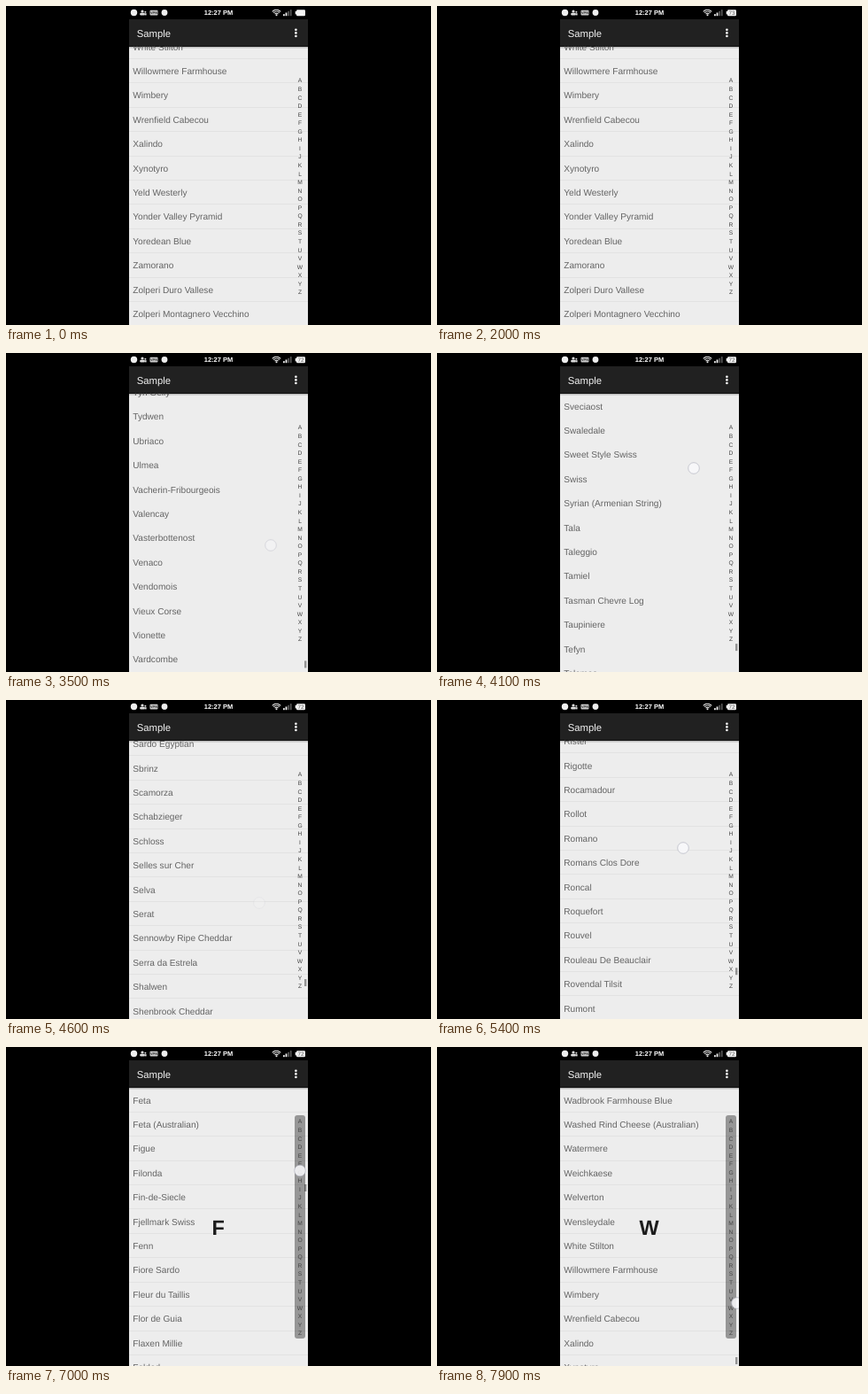
Write an HTML page with a canvas that moves like this. It is 480 px wide and 360 px high and loops after 8000 ms.

```html
<!DOCTYPE html>
<html lang="en">
<head>
<meta charset="utf-8">
<title>Indexed list</title>
<style>
html, body { margin: 0; width: 100%; height: 100%; overflow: hidden; background: #000; }
canvas { display: block; }
</style>
</head>
<body>
<canvas id="stage" width="480" height="360"></canvas>
<script>
const names = `Abbaye de Vallon,Abbaye du Mont des Pres,Abertam,Abondance,Ackawi,Acornel,Adelost,Affine au Chablis,Afuega'l Pitu,Airag,Airdeane,Aisy Cendre
Baguette Ronde,Bakers,Baladi,Balaton,Bandal,Banon,Barrow Bay Cheddar,Basket Cheese,Bath Cheese,Bavarian Bergkase,Beaufort,Beenleaf Blue
Cabecou,Cabrales,Cachaille,Caciocavallo,Caciotta,Caerphilly,Cairnsley,Calenzana,Camembert,Canestrato,Cantal,Caprice
Danablu,Danbo,Danish Fontina,Daralagjazsky,Dauphin,Delice des Bois,Denbury Drum,Derby,Dessertnyj Belyj,Devon Blue,Devon Wreath,Dolce Blu
Edam,Edelpilz,Emental Grand Cru,Emlow,Emmental,Epoisses,Esbareich,Esrom,Etorna,Evenbrook Farm Brie,Evora,Exmoor Blue
Feta,Feta (Australian),Figue,Filonda,Fin-de-Siecle,Fjellmark Swiss,Fenn,Fiore Sardo,Fleur du Taillis,Flor de Guia,Flaxen Millie,Folded
Galette Ronde,Galbrook Goat's Milk,Gammelost,Gaperon a l'Ail,Garrotxa,Gastanberra,Geitost,Gipsel Blue,Gjetost,Gloucester,Golden Ring,Gorgonzola
Halloumi,Halloumi (Australian),Halloumi-Style Cheese,Harbour Blue,Havarti,Hedda Gruyere,Hereford Leaf,Herrgardsost,Hallow Farmhouse,Herve,Hira Iti,Hushallsost
Iberico,Ibery Goat,Idiazabal,Il Tartufo,Ile d'Or,Isle of Wren
Jadel,Jermi,Jibneh Arabieh,Jinder Brie,Jolly Blue,Juustoleipa
Kadchgall,Kaseri,Kashta,Kefalotyri,Kenafa,Kernhem,Kerval Affine,Kiwarra,Kingfold Brie,Klosterkaese,Knockbray,Kugelkase
L'Aveyronnais,L'Ecir,La Taupe,Laguiole,Lairdel,Lajta,Lanwick Blue,Lancashire,Langres,Lappi,Laruns,Lavenby
Macconais,Mahlow Aged Gouda,Mahon,Malvern,Mamirolle,Manchego,Manouri,Manur,Marble Cheddar,Marbled Cheeses,Maresol,Margotin
Naboulsi,Nantais,Neufchatel,Neufchatel (Australian),Niolo,Nokkelost,Northmoor
Oaxaca,Olde Wick,Olivet au Foin,Olivet Bleu,Olivet Cendre,Orkney Mature Cheddar,Orlen,Oschtjepka,Ossau Fermier,Ossau-Iraty,Oszczypek,Oxley Blue
P'tit Berrichon,Palet de Bray,Paneer,Panela,Pannerone,Pant y Glyn,Parmesan,Parmigiano,Pas de Roche,Passenberg,Pasteurized Processed,Pate de Fromage
Quark,Quark (Australian),Quartirolo,Quatre-Monts,Quercy Petit,Queso Blanco,Queso con Frutas,Queso de Murcia,Queso del Monte,Queso Fresco,Queso Iberico,Queso Quesadilla
Rabacal,Raclette,Ragusano,Raschera,Reblochon,Red Leicester,Regal de Bresse,Reggianito,Remedou,Requeson,Richemont,Ricotta,Ricotta (Australian),Ricotta Salata
Ristel,Rigotte,Rocamadour,Rollot,Romano,Romans Clos Dore,Roncal,Roquefort,Rouvel,Rouleau De Beauclair,Rovendal Tilsit,Rumont,Rustello
Saalfeld Pfarr,Saanenkaese,Salda,Sage Derby,Sainte Maure,Saint-Marcellin,Saint-Nectaire,Saint-Paulin,Salers,Samso,San Simon,Sancerre,Sap Sago,Sardo
Sardo Egyptian,Sbrinz,Scamorza,Schabzieger,Schloss,Selles sur Cher,Selva,Serat,Sennowby Ripe Cheddar,Serra da Estrela,Shalwen,Shenbrook Cheddar
Shropshire Blue,Siraz,Sirene,Smoked Gouda,Somerset Brie,Sonnel Jack,Sottobosco Al Tartufo,Soumaintrain,Sourire Vert,Spellwood,Stonefield Organic
St. Amel Blue Cheese,Stilton,Strolling Abbot,String,Sussex Slip,Sveciaost,Swaledale,Sweet Style Swiss,Swiss,Syrian (Armenian String)
Tala,Taleggio,Tamiel,Tasman Chevre Log,Taupiniere,Tefyn,Telemea,Testouri,Tete de Moine,Tetilla,Texas Goat Cheese,Tibet,Tarnbrook Cheddar,Tilsit,Timbery Brie,Toma
Tomme Brulee,Tomme d'Abondance,Tomme de Chevre,Tomme de Romans,Tomme de Savoie,Tomme des Prairies,Tommes,Torta del Casar,Toscanello,Touree de Bois,Tourvalet
Trappe (Veritable),Trois Cornes,Tronchon,Trou du Bois,Truffe,Tupi,Turunmaa,Tymsworth,Tyn Gelly,Tydwen
Ubriaco,Ulmea,Vacherin-Fribourgeois,Valencay,Vasterbottenost,Venaco,Vendomois,Vieux Corse,Vionette,Vardcombe
Wadbrook Farmhouse Blue,Washed Rind Cheese (Australian),Watermere,Weichkaese,Welverton,Wensleydale,White Stilton,Willowmere Farmhouse,Wimbery,Wrenfield Cabecou
Xalindo,Xynotyro,Yeld Westerly,Yonder Valley Pyramid,Yoredean Blue,Zamorano,Zolperi Duro Vallese,Zolperi Montagnero Vecchino`.split(/[,\n]/);

const LOOP = 8000, ROW = 27.4, STEP = 9.56, INDEX_START = 5.9;
const alphabet = [...'ABCDEFGHIJKLMNOPQRSTUVWXYZ'];
const base = names.indexOf('Ristel');

// [seconds, rows scrolled past the base row]
const scrollKeys = [[2.4, 113.51], [2.5, 112.6], [2.7, 109.8], [2.9, 105.8], [3.1, 102.4],
  [3.3, 99.2], [3.5, 95.57], [3.7, 81], [3.9, 67], [4.1, 55], [4.3, 43], [4.6, 27.38],
  [4.8, 17.5], [5, 9.5], [5.3, 1.5], [5.4, .49], [5.6, -1.6], [5.7, -2.6]];
const fingerKeys = [[5.9, 84], [6.3, 88], [6.6, 104], [6.9, 131], [7, 139.5], [7.3, 200],
  [7.6, 280], [7.8, 296], [7.9, 289]];
const thumbKeys = [[0, 50], [5, 159], [17, 300], [22, 354]];
// start, end, then the finger's path
const swipes = [[2.4, 2.7, 305, 140, 301, 235], [3.1, 3.4, 303, 130, 299, 217],
  [4.1, 4.4, 290, 130, 286, 229], [5.3, 5.6, 278.5, 140, 277, 221]];

const g = document.getElementById('stage').getContext('2d');
g.textRendering = 'geometricPrecision';
const lerp = (a, b, f) => a + (b - a) * f;
const clamp = v => Math.max(0, Math.min(1, v));

function along(keys, t) {
  if (t <= keys[0][0]) return keys[0][1];
  const i = keys.findIndex(k => k[0] >= t);
  if (i < 0) return keys[keys.length - 1][1];
  const [a, b] = [keys[i - 1], keys[i]];
  return lerp(a[1], b[1], (t - a[0]) / (b[0] - a[0]));
}

function rect(x, y, w, h, color) {
  g.fillStyle = color;
  g.fillRect(x, y, w, h);
}

function disc(x, y, r, color) {
  g.fillStyle = color;
  g.beginPath();
  g.arc(x, y, r, 0, 7);
  g.fill();
}

function round(x, y, w, h, r, color) {
  g.fillStyle = color;
  g.beginPath();
  g.roundRect(x, y, w, h, r);
  g.fill();
}

function text(s, x, y, size, color, align = 'left', weight = '') {
  g.font = `${weight} ${size}px "Liberation Sans", Arial, sans-serif`;
  g.textAlign = align;
  g.fillStyle = color;
  g.fillText(s, x, y);
}

function touch(x, y, alpha) {
  g.globalAlpha = clamp(alpha);
  disc(x, y, 6.3, 'rgba(248,248,250,.88)');
  g.strokeStyle = 'rgba(170,172,185,.75)';
  g.lineWidth = .8;
  g.stroke();
  g.globalAlpha = 1;
}

function drawList(top, lines) {
  rect(139, 46, 202, 314, '#ededed');
  const first = Math.max(0, Math.floor(top) - 1);
  for (let i = first; i < first + 15 && i < names.length; i++) {
    const y = 60 + (i - top) * ROW;
    text(names[i], 143.3, y + 3.6, 10.1, '#646464');
    if (lines) rect(139, Math.round(y + ROW / 2 - .8), 202, 1, '#e2e2e2');
  }
}

function drawBars(t) {
  rect(139, 0, 202, 15, '#000');
  rect(139, 15, 202, 30.6, '#212121');
  const shade = g.createLinearGradient(0, 46, 0, 48.5);
  shade.addColorStop(0, 'rgba(0,0,0,.25)');
  shade.addColorStop(1, 'rgba(0,0,0,0)');
  rect(139, 45.6, 202, 3, shade);
  text('Sample', 147.7, 34.6, 11.3, '#f2f2f2');
  for (const y of [26.8, 30.4, 34]) disc(327.4, y, 1.35, '#f4f4f4');

  disc(144.5, 7.5, 3.7, '#eee');
  disc(154, 6, 1.6, '#ddd');
  round(151.2, 7.8, 5.6, 2.8, 1.3, '#ddd');
  disc(157.4, 6.8, 1, '#ddd');
  rect(156.6, 8.2, 2, 2.2, '#ddd');
  round(162.5, 4.8, 9, 5.6, 1, '#ccc');
  text('VPN', 167, 9.1, 3.9, '#222', 'center', 'bold');
  disc(179, 7.5, 3.4, '#eee');
  text('12:27 PM', 240, 10.3, 7.5, '#fff', 'center', 'bold');

  g.strokeStyle = '#eee';
  g.lineWidth = 1.1;
  for (const r of [2.6, 4.6, 6.5]) {
    g.beginPath();
    g.arc(305.5, 10.8, r, -Math.PI * .76, -Math.PI * .24);
    g.stroke();
  }
  disc(305.5, 10.2, 1, '#eee');
  for (let i = 0; i < 4; i++)
    rect(313 + i * 2.6, 9.2 - i * 1.7, 1.8, 2 + i * 1.7, i < 2 ? '#eee' : '#555');
  round(328, 4.2, 10, 7, 1.2, '#f4f4f4');
  rect(326.7, 6, 1.5, 3.4, '#f4f4f4');
  if (t >= .3) text(t < 2.1 ? '73' : '72', 333, 10, 6.2, '#555', 'center');
}

function draw(t) {
  const indexing = t >= INDEX_START;
  const fade = clamp((t - INDEX_START + .1) / .3);
  const fingerY = along(fingerKeys, t);
  const section = Math.floor((along(fingerKeys, t - .1) - 79.5) / STEP);
  const rows = along(scrollKeys, t);
  const top = indexing ? names.findIndex(n => n[0] === alphabet[section]) : base + rows;

  rect(0, 0, 480, 360, '#000');
  g.save();
  g.beginPath();
  g.rect(139, 0, 202, 360);
  g.clip();
  drawList(top, t < 3 || t >= 4.4);

  if (t >= 2.4) {
    const y = indexing ? along(thumbKeys, section) : 306 + rows * .475;
    rect(337, y - 4, 2.4, 8, 'rgba(0,0,0,.38)');
  }
  if (indexing) {
    g.globalAlpha = fade;
    round(326, 77, 12, 252, 3, 'rgba(0,0,0,.37)');
    text(alphabet[section], 239.7, 212, 23.5, '#1c1c1c', 'center', 'bold');
    g.globalAlpha = 1;
  }
  alphabet.forEach((c, i) => text(c, 332, 86.4 + i * STEP, 6.7, '#444', 'center'));

  for (const [a, b, x0, y0, x1, y1] of swipes) {
    if (t < a || t > b + .25) continue;
    const f = clamp((t - a) / (b - a));
    touch(lerp(x0, x1, f), lerp(y0, y1, f), 1 - (t - b) / .25);
  }
  if (indexing) touch(332 + 7 * clamp((t - 7) / .9), fingerY, 1);
  drawBars(t);
  g.restore();
}

function tick(now) {
  draw(Math.floor((now % LOOP) / 100 + 1e-6) / 10);
  requestAnimationFrame(tick);
}
requestAnimationFrame(tick);
</script>
</body>
</html>
```
